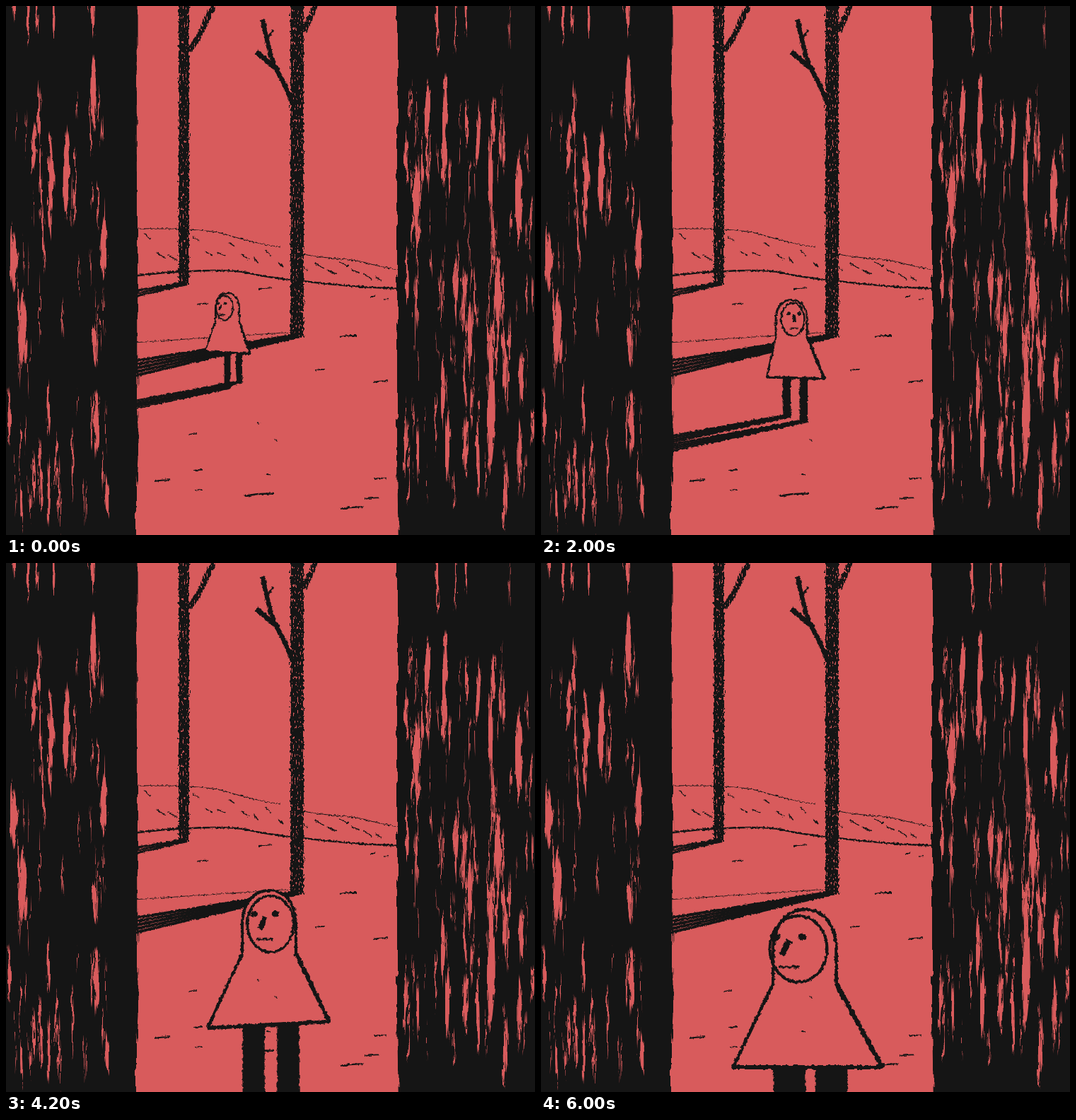
An HTML page that plays this animation: 748 px wide and 748 px high, repeating every 6100 ms.

```html
<!DOCTYPE html>
<html lang="en">
<head>
<meta charset="utf-8">
<title>Walk in the woods</title>
<style>
html, body { margin: 0; width: 100%; height: 100%; overflow: hidden; background: #d85b5c; }
svg { position: absolute; left: 0; top: 0; width: 100%; height: 100%; will-change: transform; }
</style>
</head>
<body>
<svg id="back" viewBox="0 0 748 748"></svg>
<svg id="walker" viewBox="0 0 748 748"></svg>
<svg id="front" viewBox="0 0 748 748"></svg>
<script>
const RED = '#d85b5c', BLACK = '#151515';
const LOOP = 6100, STEP = 100, EDGE = 180;
const el = id => document.getElementById(id);
const path = (d, w, fill = 'none', color = BLACK) =>
  `<path d="${d}" fill="${fill}" stroke="${w ? color : 'none'}" stroke-width="${w}" stroke-linejoin="round"/>`;
const seg = (x1, y1, x2, y2, w) => path(`M${x1} ${y1}L${x2} ${y2}`, w);
const oval = (x, y, rx, ry, w, fill = 'none') =>
  `<ellipse cx="${x}" cy="${y}" rx="${rx}" ry="${ry}" fill="${fill}" stroke="${BLACK}" stroke-width="${w}"/>`;
const group = (filter, body) => `<g filter="url(#${filter})">${body}</g>`;

let seed = 41;
const rnd = (a = 0, b = 1) => a + (b - a) * (seed = seed * 16807 % 2147483647) / 2147483647;

// Rough edges; with grain, specks are cut out as well
function rough(id, freq, scale, grain) {
  const cut = grain ? `
    <feColorMatrix in="n" values="0 0 0 0 0  0 0 0 0 0  0 0 0 0 0  0 0 0 -14 10" result="m"/>
    <feComposite in="d" in2="m" operator="in"/>` : '';
  return `<filter id="${id}" filterUnits="userSpaceOnUse" x="-20" y="-20" width="788" height="788" color-interpolation-filters="sRGB">
    <feTurbulence type="fractalNoise" baseFrequency="${freq}" numOctaves="2" seed="3" result="n"/>
    <feDisplacementMap in="SourceGraphic" in2="n" scale="${scale}" xChannelSelector="R" yChannelSelector="G" result="d"/>${cut}
  </filter>`;
}

// Shadow thrown to the left as a fan of strokes
function cast(x, y, slope, spread, n, w) {
  let s = '';
  for (let i = 0; i < n; i++) {
    const end = y + (x - EDGE) * slope + spread * (i / (n - 1) - .5);
    s += seg(x, y + (i / (n - 1) - .5) * 3, EDGE, end, w);
  }
  return s;
}

// ---------- scenery ----------
// x, y, length
const ticks = [
  [270,422,16], [358,400,18], [471,468,25], [437,515,14], [519,532,21], [515,411,7], [534,415,7],
  [258,606,12], [265,657,13], [210,672,22], [267,685,11], [337,693,41], [473,711,32], [507,697,20], [521,669,17]
];

function drawBack() {
  let marks = ticks.map(([x, y, n]) => path(`M${x} ${y}q${n / 2} ${-n * .1} ${n} ${-n * .08}`, 1.3 + n * .03)).join('');
  for (let i = 0; i < 20; i++) {
    const u = i / 20, x = 195 + u * 345, y = 315 + 58 * u ** 1.6 + rnd(6, 40) * (1 - u * .6);
    marks += seg(x, y, x + rnd(6, 14), y + rnd(4, 9), 1.5);
  }
  const hills =
    path('M180 315C240 314 280 317 300 320C335 330 355 336 388 341M420 351C450 357 480 357 500 361C520 366 540 371 556 373', 1.1) +
    path('M180 382C215 377 235 376 262 375Q320 372 345 378T420 389Q480 396 520 398L560 400', 2.6);
  const shade = cast(256, 392, .2, 8, 3, 3.2) + cast(414, 466, .2, 21, 5, 4) + seg(EDGE, 476, 408, 461, .9);
  const trees =
    path('M251.5 -9V394', 15) + path('M259 64Q272 45 276 36T294 -2', 8) +
    path('M411.5 -9V468', 19) + path('M420 36Q428 24 438 -3', 8);
  const twigs =
    path('M405 138Q392 104 381 88Q370 60 363 19', 6.5) +
    path('M386 92Q372 80 354 65', 7) + path('M369 46L378 34', 3);
  el('back').innerHTML =
    '<defs>' + rough('line', '.3', 4) + rough('ink', '.22', 4.5) + rough('crayon', '.5 .2', 6, true) + rough('bark', '.25 .035', 8) + '</defs>' +
    `<rect width="748" height="748" fill="${RED}"/>` + group('line', hills + marks + shade + twigs) + group('crayon', trees);
}

// Largest gaps in the bark: x, y, length
const gaps = [
  [40,163,75], [63,178,114], [86,168,136], [139,290,98], [12,318,90], [24,398,116], [124,448,64], [128,542,90], [123,68,110],
  [597,102,84], [621,92,90], [580,215,130], [689,128,70], [725,200,150], [695,345,130], [687,495,170], [655,415,110]
];
const gap = (x, y, h, w) => {
  const end = x + rnd(-3, 3);
  return path(`M${x} ${y}Q${x - w} ${y + h / 2} ${end} ${y + h}Q${x + w} ${y + h / 2} ${x} ${y}Z`, 0, RED);
};
function scatter(n, x0, x1, y0, y1, wide) {
  let s = '';
  for (let i = 0; i < n; i++) {
    const k = rnd();
    s += gap(rnd(x0, x1), rnd(y0, y1), rnd(25, 70) + k * 50, 1 + k * k * wide);
  }
  return s;
}

function drawFront() {
  const specks = seg(355, 589, 359, 590, 1.3) + seg(379, 613, 384, 614, 1.5) + seg(367, 662, 374, 663, 1.3);
  const trunks =
    `<path d="M-20 -20H185.500L186.500 640L184 680V768H-20ZM553 -20H768V768H555L553 640Z" fill="${BLACK}"/>` +
    gaps.map(([x, y, h]) => gap(x, y, h, 4 + h * .04)).join('') +
    scatter(8, 5, 125, -50, -25, 6) + scatter(6, 600, 720, -40, 0, 4) +
    scatter(55, 2, 144, 100, 640, 3) + scatter(16, 5, 144, 620, 700, 5) +
    scatter(135, 562, 745, 100, 660, 5);
  el('front').innerHTML = group('line', specks) + group('bark', trunks);
}

// ---------- walker ----------
// Poses from far to near: top x, top y, height to hem, hem centre, hem width, hem tilt,
// face offset, look, hip offset, foot y, stride
const poses = [
  [313, 406,  84, 313,  64,  3, -4, -.35, 9, 537, -8],
  [354, 415, 110, 360,  81,  2,  2,  .1,  0, 583,  7],
  [357, 429, 121, 360,  91, 15,  1,  0,  -2, 623, 22],
  [375, 440, 140, 376, 123, 13,  2,  .2, -2, 694, 22],
  [372, 463, 190, 371, 172, -9,  2, -.25, 4, 775,  5],
  [373, 490, 223, 378, 207,  0, -5, -.26, 3, 840,  0],
  [373, 490, 223, 377, 211,  0, -9, -.32, 4, 840,  0]
];
// time and position along the poses
const pace = [[0,0], [700,.86], [1200,1], [2100,1.04], [2700,2], [3500,3], [4200,4], [4900,4.93], [5200,5], [6000,6]];

const lerp = (a, b, u) => a + (b - a) * u;
function poseAt(k) {
  const i = Math.min(Math.floor(k), poses.length - 2);
  return poses[i].map((v, j) => lerp(v, poses[i + 1][j], k - i));
}

function leg(x, top, foot, knee, w, slope) {
  const shade = foot < 748 ? cast(x + w * .4, foot - 2, slope, w * .8, 4, w * .26) : '';
  return shade + path(`M${x} ${top}Q${x + knee} ${(top + foot) / 2} ${x} ${foot}`, w);
}

function robe(x, y, size, hem, line) {
  const r = size * .2, side = y + size * .26, neck = y + size * .47, up = y + size * .1;
  const [lx, ly, rx, ry] = hem;
  const d = `M${lx} ${ly}L${x - r} ${neck}V${side}C${x - r} ${up} ${x - r * .6} ${y} ${x} ${y}` +
    `S${x + r} ${up} ${x + r} ${side}V${neck}L${rx} ${ry}Z`;
  return path(d, line, RED) + seg(x + r, neck, rx, ry, line * 1.4) + seg(lx, ly, rx, ry, line * 1.3);
}

function face(x, y, rx, ry, look, line) {
  const mid = x + look * rx, ey = y - ry * .36, ny = y - ry * .26;
  const eye = side => oval(mid + side * rx * .46, ey, rx * .14, rx * .11, 1.2, BLACK);
  return oval(x, y, rx, ry, line * .85) + eye(-1) + eye(1) +
    seg(mid, ny, mid + look * rx * .8, ny + ry * .44, .8 + rx * .2) +
    seg(mid - rx * .37, y + ry * .54, mid + rx * .37, y + ry * .54, 1.4 + rx * .04);
}

function drawWalker(t) {
  let i = 0;
  while (i < pace.length - 2 && t >= pace[i + 1][0]) i++;
  const [t0, k0] = pace[i], [t1, k1] = pace[i + 1], u = (t - t0) / (t1 - t0);
  const [x, y, size, hx, hw, tilt, turn, look, hip, foot, stride] = poseAt(lerp(k0, k1, u));

  // one full stride per stretch of walking
  const swing = k1 - k0 > .5 && k0 < 4.5 ? Math.sin(u * 2 * Math.PI) : 0;
  const bob = -Math.abs(swing) * size * .04, lift = size * .06;
  const line = 1.2 + size * .0155, rx = size * (.115 + size * .0003);
  const legW = size * (.105 + Math.max(0, size - 140) * .0012);
  const slope = .2 + Math.max(0, size - 110) * .0012;
  const hemY = y + size;
  const hem = [hx - hw / 2, hemY - tilt / 2, hx + hw / 2, hemY + tilt / 2];
  const step = side => leg(hx + hip + side * hw * .14, hemY - 8,
    foot + side * stride / 2 - Math.max(0, -side * swing) * lift, Math.min(0, side * stride * .4), legW, slope);

  el('walker').innerHTML = group('ink', step(-1) + step(1) +
    `<g transform="translate(0 ${bob})">` + robe(x, y, size, hem, line) +
    face(x + turn, y + size * .25, rx, size * .21, look, line) + '</g>');
  document.querySelector('#ink feTurbulence').setAttribute('seed', 1 + t / STEP);
}

drawBack();
drawFront();
let last = -1;
function tick() {
  const t = Math.floor(performance.now() % LOOP / STEP) * STEP;
  if (t !== last) drawWalker(last = t);
  requestAnimationFrame(tick);
}
tick();
</script>
</body>
</html>
```
